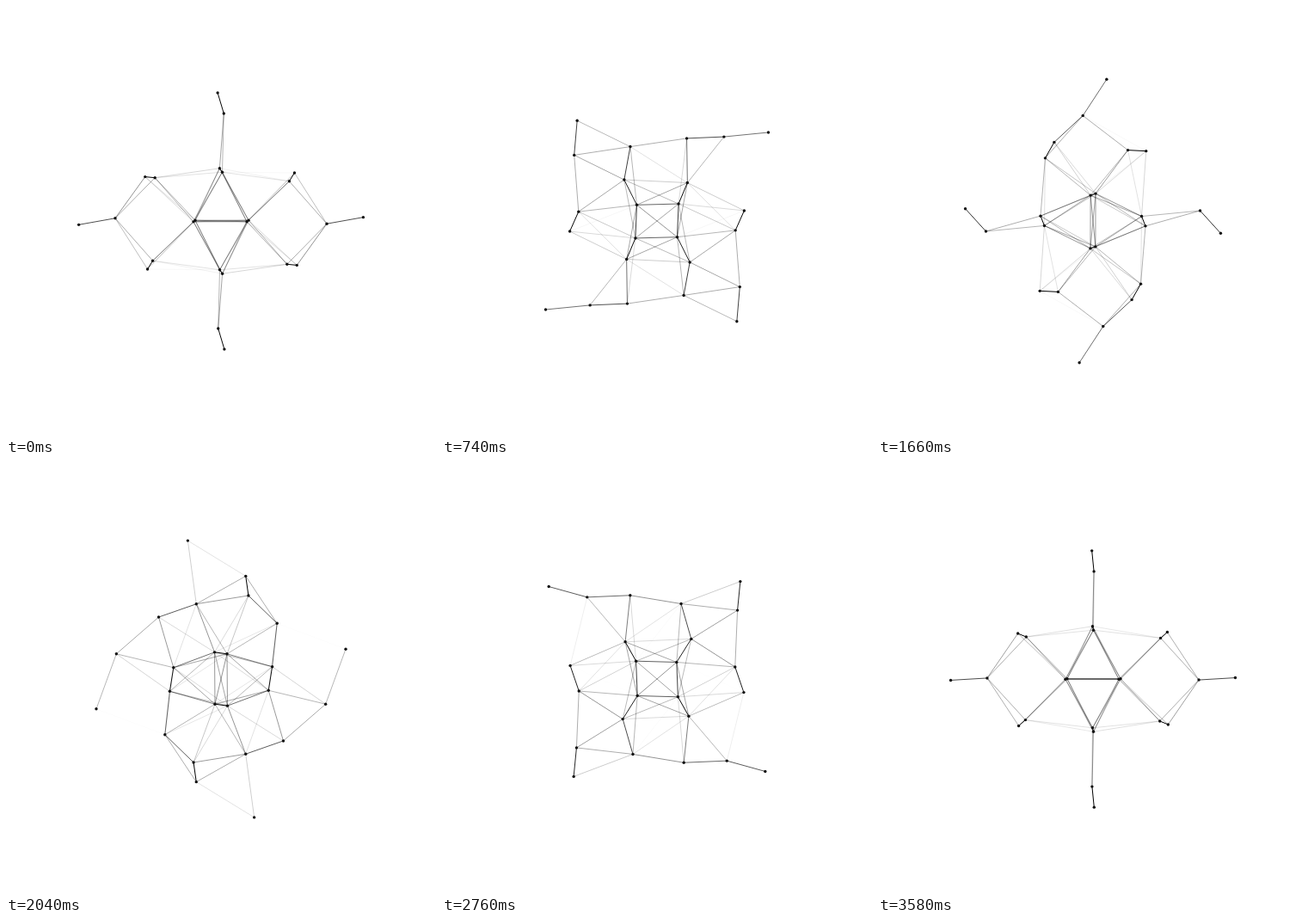
Recreate the animation shown at these times as an HTML page with a canvas. Size 500 px wide and 500 px high, loop 3.6 s.

```html
<!DOCTYPE html>
<html>
<head>
<meta charset="utf-8">
<style>
  html, body { margin: 0; height: 100%; overflow: hidden; background: #fff; }
  canvas { display: block; }
</style>
</head>
<body>
<canvas id="stage" width="500" height="500"></canvas>
<script>
const ctx = document.getElementById('stage').getContext('2d');
const LOOP = 3600, STEP = 20;
const GOLD = (1 + Math.sqrt(5)) / 2;
const FOCAL = 128.6;

// Two icosahedra seen in perspective, turning in opposite directions.
const solids = [{ size: 0.3755, spin: 1 }, { size: 0.4175, spin: -1 }];

const vertices = [];
for (const a of [-1, 1]) {
  for (const b of [-GOLD, GOLD]) {
    vertices.push([a, 0, b], [0, b, a], [b, a, 0]);
  }
}

function project([x, y, z], { size, spin }, angle) {
  const k = FOCAL * size / (1 - size * z);
  const c = Math.cos(angle * spin), s = Math.sin(angle * spin);
  return [250 + k * (x * c - y * s), 250 + k * (x * s + y * c)];
}

function link(p, q) {
  const alpha = Math.min(1, (86 - Math.hypot(p[0] - q[0], p[1] - q[1])) / 62);
  if (alpha <= 0) return;
  ctx.strokeStyle = `rgba(0,0,0,${alpha})`;
  ctx.beginPath();
  ctx.moveTo(...p);
  ctx.lineTo(...q);
  ctx.stroke();
}

function dot([x, y]) {
  ctx.beginPath();
  ctx.arc(x, y, 1.7, 0, 2 * Math.PI);
  ctx.fill();
}

function draw() {
  const time = Math.floor(performance.now() % LOOP / STEP) * STEP;
  const angle = (1.5 + 180 * time / LOOP) * Math.PI / 180;
  const points = solids.flatMap(solid => vertices.map(v => project(v, solid, angle)));

  ctx.fillStyle = '#fff';
  ctx.fillRect(0, 0, 500, 500);
  ctx.lineWidth = 1;
  points.forEach((p, i) => points.slice(i + 1).forEach(q => link(p, q)));
  ctx.fillStyle = '#111';
  points.forEach(dot);
  requestAnimationFrame(draw);
}
draw();
</script>
</body>
</html>
```
